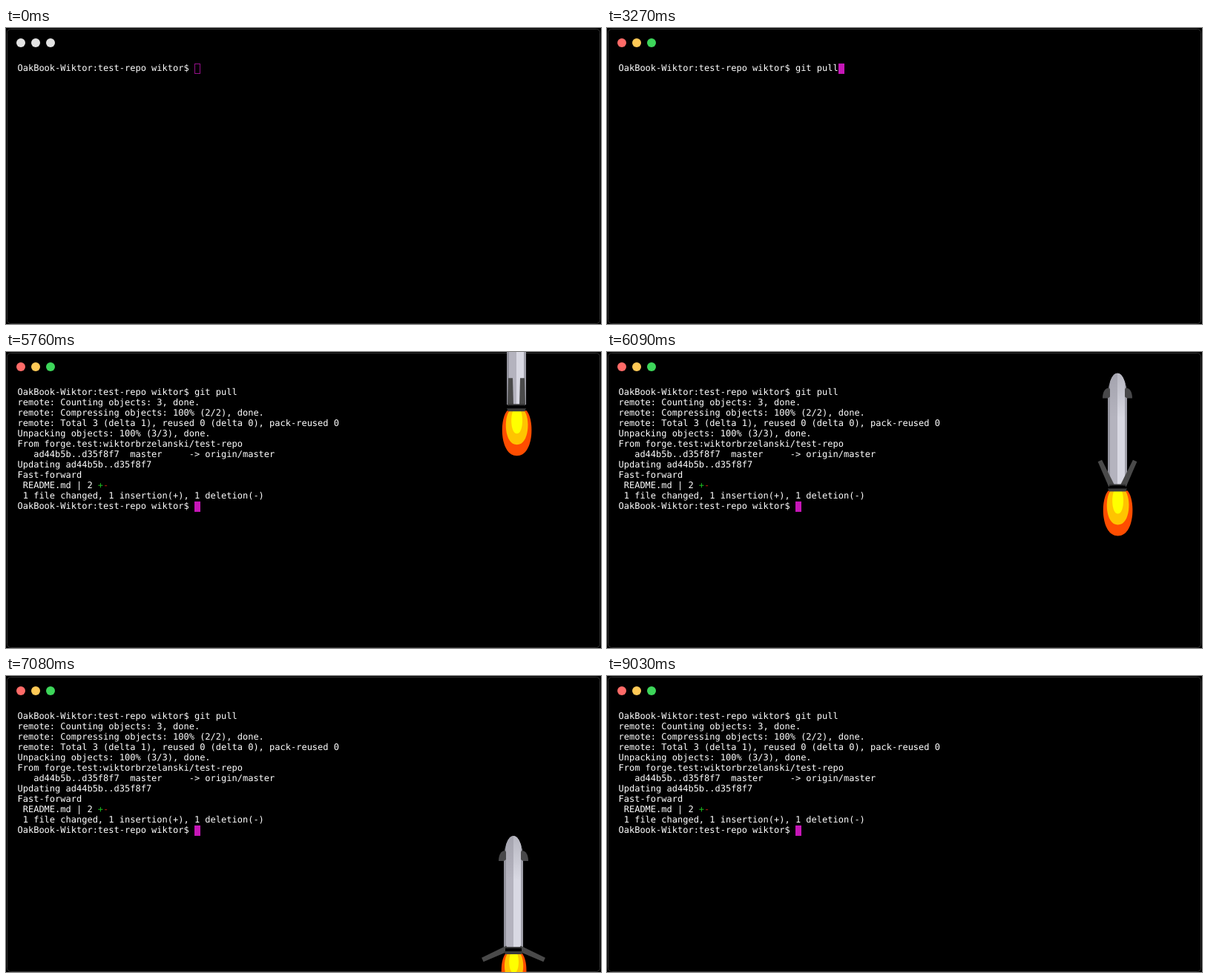
An HTML page with a canvas for the animation above (9300 ms loop, 802 by 400 pixels).

```html
<!DOCTYPE html>
<html lang="en">
<head>
<meta charset="utf-8">
<title>Terminal landing</title>
<style>
  html, body { margin: 0; width: 100%; height: 100%; overflow: hidden; background: #000; }
  canvas { display: block; }
</style>
</head>
<body>
<canvas id="stage" width="802" height="400"></canvas>
<script>
const ctx = document.getElementById('stage').getContext('2d');
const LOOP = 9300, LEFT = 15.5, TOP = 48, CHAR = 7.224, LINE = 14;
const FOCUS = 1830, ENTER = 3510, LAND = 7488, GONE = 7980;
const PROMPT = 'OakBook-Wiktor:test-repo wiktor$ ';
const COMMAND = 'git pull';
const KEYS = [2040, 2250, 2370, 2490, 2610, 2760, 3000, 3210];
const LIGHTS = [[255, 107, 104], [255, 201, 86], [61, 214, 90]];

// Each output line with the time it appears.
const OUTPUT = [
  [5190, 'remote: Counting objects: 3, done.'],
  [5220, 'remote: Compressing objects: 100% (2/2), done.'],
  [5250, 'remote: Total 3 (delta 1), reused 0 (delta 0), pack-reused 0'],
  [5280, 'Unpacking objects: 100% (3/3), done.'],
  [5310, 'From forge.test:wiktorbrzelanski/test-repo'],
  [5310, '   ad44b5b..d35f8f7  master     -> origin/master'],
  [5400, 'Updating ad44b5b..d35f8f7'],
  [5400, 'Fast-forward'],
  [5430, ' README.md | 2 '],
  [5430, ' 1 file changed, 1 insertion(+), 1 deletion(-)'],
  [5490, PROMPT]
];

const clamp = v => Math.max(0, Math.min(1, v));

function write(text, row, col = 0, color = '#fff') {
  ctx.fillStyle = color;
  ctx.fillText(text, LEFT + col * CHAR, TOP + 10 + row * LINE);
}

function fillPath(d, color) {
  ctx.fillStyle = color;
  ctx.fill(new Path2D(d));
}

function box(x, y, w, h, color) {
  ctx.fillStyle = color;
  ctx.fillRect(x, y, w, h);
}

function drawWindow(t) {
  ctx.strokeStyle = '#333';
  ctx.lineWidth = 1;
  ctx.beginPath();
  ctx.roundRect(1.5, 1.5, 799, 398, 5);
  ctx.stroke();

  const lit = clamp((t - FOCUS + 30) / 120);
  LIGHTS.forEach((rgb, i) => {
    ctx.fillStyle = `rgb(${rgb.map(c => Math.round(227 + (c - 227) * lit))})`;
    ctx.beginPath();
    ctx.arc(20 + i * 20, 20, 6, 0, Math.PI * 2);
    ctx.fill();
  });
}

function drawCursor(t, row, col) {
  const x = Math.round(LEFT + col * CHAR), y = TOP + row * LINE;
  if (t < FOCUS) {
    ctx.strokeStyle = 'rgba(248,28,229,.6)';
    ctx.strokeRect(x + .5, y + .5, 7, 13);
  } else {
    box(x, y, 8, 14, 'rgba(248,28,229,.8)');
  }
}

function drawTerminal(t) {
  const typed = KEYS.filter(k => t >= k).length;
  write(PROMPT + COMMAND.slice(0, typed), 0);

  const shown = OUTPUT.filter(([at]) => t >= at).length;
  OUTPUT.slice(0, shown).forEach(([, text], i) => write(text, i + 1));
  if (shown > 8) {
    write('+', 9, 15, '#1dc121');
    write('-', 9, 16, '#c51e14');
  }

  if (t < ENTER) drawCursor(t, 0, PROMPT.length + typed);
  else if (shown === OUTPUT.length) drawCursor(t, shown, PROMPT.length);
  else drawCursor(t, shown === 6 ? 5 : shown + 1, 0);
}

function flame(w, h, color) {
  const a = w * .65, b = w * 1.2, c = w * 1.15;
  fillPath(`M${-a} 0C${-b} ${h * .2} ${-c} ${h} 0 ${h}C${c} ${h} ${b} ${h * .2} ${a} 0Z`, color);
}

function drawBody() {
  ctx.save();
  ctx.clip(new Path2D('M-13 151V35C-13 14-7 0 0 0S13 14 13 35V151Z'));
  box(-13, 0, 26, 151, '#92929c');
  box(-10, 0, 10, 151, '#b4b3be');
  box(0, 0, 10, 151, '#d9d9e3');
  box(10, 0, 3, 151, '#a0a0aa');
  const shade = ctx.createLinearGradient(0, 0, 0, 60);
  shade.addColorStop(0, 'rgba(150,150,160,.5)');
  shade.addColorStop(1, 'rgba(150,150,160,0)');
  box(-13, 0, 26, 60, shade);
  ctx.restore();
}

function drawSide(side, angle) {
  ctx.save();
  ctx.scale(side, 1);
  fillPath('M20 34C20 26 17 20 11 20L10 22V32L13 34Z', '#48484a');
  ctx.translate(8, 152);
  ctx.rotate(angle);
  fillPath('M-4 0L-3-37H3L4 0Z', '#4a4a4a');
  ctx.restore();
}

function drawRocket(t) {
  if (t < 5370 || t >= GONE) return;
  const drift = clamp((6510 - t) / 420);
  const nose = 233.5 - 1.05e-4 * Math.max(0, LAND - t) ** 2;
  const angle = Math.max(0, 116.2 - 6.93e-5 * Math.max(0, 7238 - t) ** 2) * Math.PI / 180;

  ctx.save();
  ctx.globalAlpha = clamp((GONE - t) / (GONE - LAND));
  ctx.translate(684 + 4 * drift, nose);

  if (t < LAND) {
    ctx.save();
    ctx.translate(.6, 159);
    const size = .85 + .15 * drift;
    ctx.scale(size, size);
    flame(20, 61, '#ff4d00');
    flame(15, 46, '#ffc400');
    flame(7.5, 31, '#ffff00');
    ctx.restore();
  }

  drawBody();
  drawSide(-1, angle);
  drawSide(1, angle);
  box(-11, 150, 22, 2, '#333');
  box(-11, 152, 22, 4, '#000');
  fillPath('M-13 156H13L11 160H-11Z', '#3c3c3c');
  ctx.restore();
}

function draw(now) {
  const t = now % LOOP;
  ctx.fillStyle = '#000';
  ctx.fillRect(0, 0, 802, 400);
  ctx.font = '12px "DejaVu Sans Mono", monospace';
  ctx.textRendering = 'geometricPrecision';
  drawWindow(t);
  drawTerminal(t);
  drawRocket(t);
}

const start = performance.now();
function tick() {
  draw(performance.now() - start);
  requestAnimationFrame(tick);
}
tick();
</script>
</body>
</html>
```
